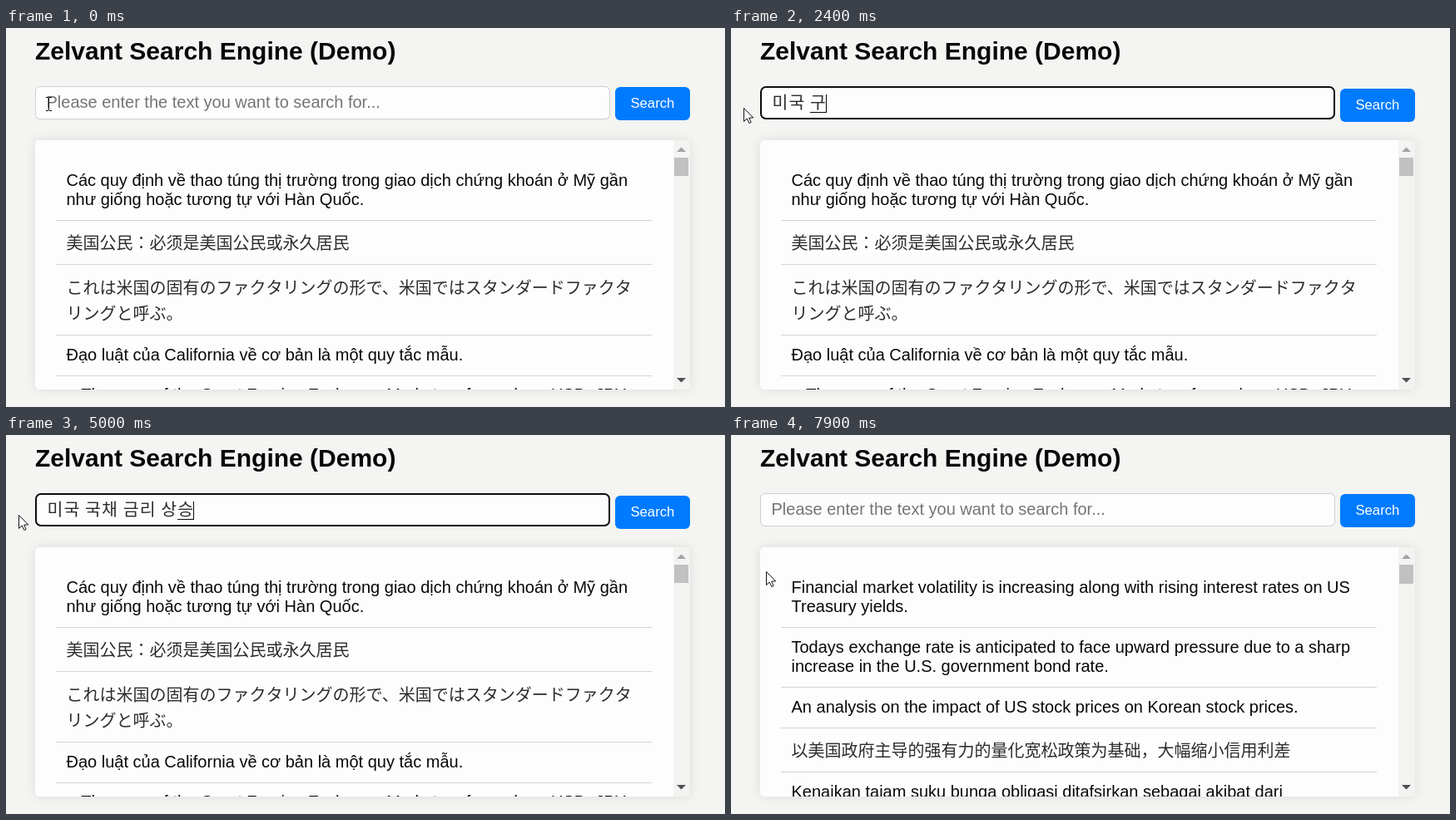
Write an HTML page with a canvas that moves like this. It is 864 px wide and 456 px high and loops after 8000 ms.

```html
<!DOCTYPE html>
<html lang="en">
<head>
<meta charset="utf-8">
<title>Search demo</title>
<style>
html, body { margin: 0; width: 100%; height: 100%; overflow: hidden; background: #f4f4f2; }
canvas { display: block; }
</style>
</head>
<body>
<canvas id="stage" width="864" height="456"></canvas>
<script>
const ctx = document.getElementById('stage').getContext('2d');
const LOOP = 8000, STEP = 100;
const FOCUS = 300, TYPE = 1200, KEY = 157, SUBMIT = 5300;
const LATIN = '"Liberation Sans", Arial, sans-serif';
const CJK = '"Noto Sans CJK JP", "Noto Sans CJK", sans-serif';
const KOREAN = '"Noto Sans CJK KR", "Noto Sans CJK", sans-serif';
const PAGE = '#f4f4f2', PAPER = '#fdfdfd', INK = '#080808', SOFT = '#2c2c2c', LINE = '#d4d4d8';

// Input text after each key press of the Korean IME.
const typed = ['ㅁ', '미', '믹', '미구', '미국', '미국 ',
  '미국 ㄱ', '미국 구', '미국 국', '미국 국ㅊ', '미국 국채', '미국 국채 ',
  '미국 국채 ㄱ', '미국 국채 그', '미국 국채 금', '미국 국채 금ㄹ', '미국 국채 금리', '미국 국채 금리 ',
  '미국 국채 금리 ㅅ', '미국 국채 금리 사', '미국 국채 금리 상',
  '미국 국채 금리 상ㅅ', '미국 국채 금리 상스', '미국 국채 금리 상승'];

const before = {
  rules: [231, 284, 369, 418],
  lines: [
    [190, 'Các quy định về thao túng thị trường trong giao dịch chứng khoán ở Mỹ gần'],
    [213, 'như giống hoặc tương tự với Hàn Quốc.'],
    [266, '美国公民：必须是美国公民或永久居民', true],
    [320, 'これは米国の固有のファクタリングの形で、米国ではスタンダードファクタ', true],
    [351, 'リングと呼ぶ。', true],
    [400, 'Đạo luật của California về cơ bản là một quy tắc mẫu.'],
    [448, ' - The case of the Great Foreign Exchange Market performed are USD, JPY,']
  ]
};
const after = {
  rules: [231, 303, 352, 405],
  lines: [
    [190, 'Financial market volatility is increasing along with rising interest rates on US'],
    [213, 'Treasury yields.'],
    [262, 'Todays exchange rate is anticipated to face upward pressure due to a sharp'],
    [285, 'increase in the U.S. government bond rate.'],
    [334, 'An analysis on the impact of US stock prices on Korean stock prices.'],
    [387, '以美国政府主导的强有力的量化宽松政策为基础，大幅缩小信用利差', true],
    [436, 'Kenaikan tajam suku bunga obligasi ditafsirkan sebagai akibat dari']
  ]
};

// Pointer path: time, x, y.
const path = [
  [0, 51, 91], [400, 51, 91], [700, 8, 102], [900, 15, 96], [5500, 15, 96],
  [6300, 24, 114], [6800, 9, 131], [7200, 37, 159], [7600, 42, 164], [8000, 42, 164]
];

function pointer(t) {
  const i = path.findIndex(p => p[0] > t);
  const [t0, x0, y0] = path[i - 1], [t1, x1, y1] = path[i];
  let u = (t - t0) / (t1 - t0);
  u = u * u * (3 - 2 * u);
  return [Math.round(x0 + (x1 - x0) * u), Math.round(y0 + (y1 - y0) * u)];
}

function text(str, x, y, font, color) {
  ctx.font = font;
  ctx.fillStyle = color;
  ctx.fillText(str, x, y);
}

function rect(x, y, w, h, color) {
  ctx.fillStyle = color;
  ctx.fillRect(x, y, w, h);
}

function round(x, y, w, h, r, color) {
  ctx.beginPath();
  ctx.roundRect(x, y, w, h, r);
  ctx.fillStyle = color;
  ctx.fill();
}

function shape(points, fill, stroke) {
  ctx.beginPath();
  points.forEach(([x, y]) => ctx.lineTo(x, y));
  ctx.closePath();
  ctx.fillStyle = fill;
  ctx.fill();
  if (stroke) {
    ctx.strokeStyle = stroke;
    ctx.lineWidth = 1;
    ctx.stroke();
  }
}

function drawPanel(page) {
  ctx.save();
  ctx.shadowColor = 'rgba(0, 0, 0, 0.1)';
  ctx.shadowBlur = 13;
  round(35, 135, 787, 300, 5, PAPER);
  ctx.restore();

  ctx.save();
  ctx.beginPath();
  ctx.roundRect(35, 135, 787, 300, 5);
  ctx.clip();
  for (const y of page.rules) rect(60, y, 716, 1, LINE);
  for (const [y, str, cjk] of page.lines) {
    text(str, 72.5, y, cjk ? '300 20px ' + CJK : '20px ' + LATIN, cjk ? SOFT : INK);
  }
  rect(802, 135, 20, 300, '#f3f3f2');
  rect(803, 156, 17, page === after ? 23 : 22, '#c1c1c1');
  shape([[806, 149], [811.5, 143.5], [817, 149]], '#a3a3a3');
  shape([[806, 421], [811.5, 426.5], [817, 421]], '#505050');
  ctx.restore();
}

function drawQuery(str, caretOn) {
  let x = 49, last = 49;
  for (const ch of str) {
    last = x;
    if (ch === ' ') {
      x += 5.6;
    } else {
      text(ch, x + 0.5, 97, '300 20.5px ' + KOREAN, SOFT);
      x += 20;
    }
  }
  x = Math.round(x);
  if (str && !str.endsWith(' ')) rect(Math.round(last), 101, x - Math.round(last), 1, INK);
  if (caretOn) rect(str ? x - 1 : x, 80, 1, 22, INK);
}

function drawForm(t) {
  const focused = t >= FOCUS && t < SUBMIT;
  const edge = focused ? 2 : 1;
  const radius = focused ? 7 : 6;
  round(35, 70, 691, 40, radius, focused ? '#0c0c0c' : '#cfcfcf');
  round(35 + edge, 70 + edge, 691 - 2 * edge, 40 - 2 * edge, radius - edge, PAPER);

  const keys = focused ? Math.floor((t - TYPE) / KEY) : -1;
  const query = keys < 0 ? '' : typed[Math.min(keys, typed.length - 1)];
  if (!query) text('Please enter the text you want to search for...', 48.5, 96, '20px ' + LATIN, '#757575');
  if (focused) drawQuery(query, query || (t - FOCUS) % 1000 < 500);

  const drop = focused ? 2 : 0;
  round(732, 71 + drop, 90, 40, 6, '#007bff');
  text('Search', 750.5, 96 + drop, '16.67px ' + LATIN, '#ffffff');
}

function drawPointer(t) {
  const [x, y] = pointer(t);
  if (x > 35 && y < 110) {
    rect(x, y - 7, 1, 15, INK);
    rect(x - 3, y - 8, 3, 1, INK);
    rect(x + 1, y - 8, 3, 1, INK);
    rect(x - 3, y + 8, 3, 1, INK);
    rect(x + 1, y + 8, 3, 1, INK);
    return;
  }
  const outline = [[0, 0], [0, 16], [3.7, 12.5], [6.3, 18], [8.6, 17], [6.2, 11.6], [11.2, 11.4]];
  shape(outline.map(([a, b]) => [x + a + 0.5, y + b + 0.5]), '#ffffff', '#111111');
}

function draw(now) {
  const t = Math.floor((now % LOOP) / STEP) * STEP;
  rect(0, 0, 864, 456, PAGE);
  text('Zelvant Search Engine (Demo)', 35, 38, 'bold 30px ' + LATIN, INK);
  drawForm(t);
  drawPanel(t < SUBMIT ? before : after);
  drawPointer(t);
}

const start = performance.now();
function tick() {
  draw(performance.now() - start);
  requestAnimationFrame(tick);
}
tick();
</script>
</body>
</html>
```
